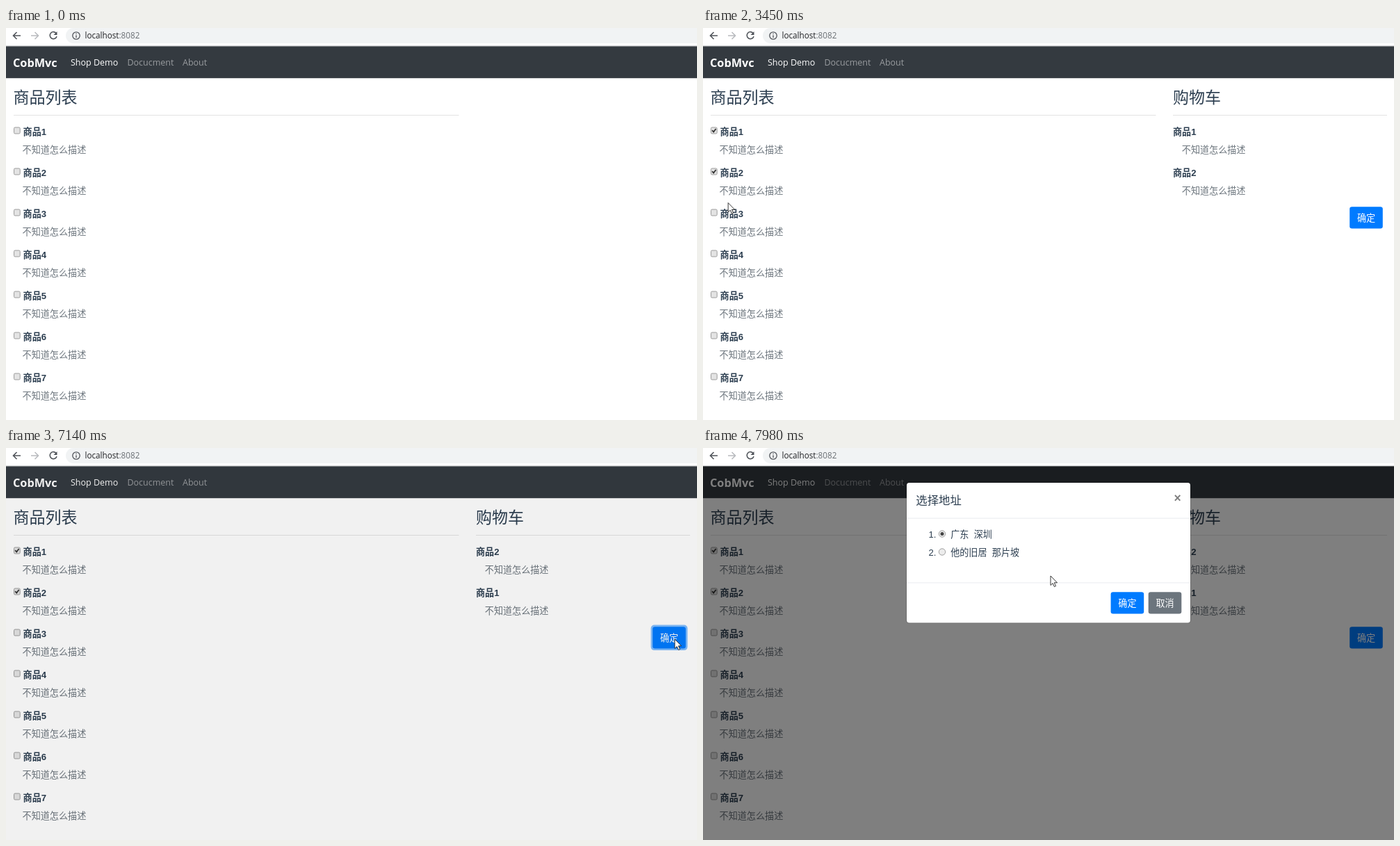
Animation of 994x564 px, one loop 8 s. Source, as an HTML page:

```html
<!DOCTYPE html>
<html lang="zh">
<head>
<meta charset="utf-8">
<title>Shop Demo</title>
<style>
html, body { margin: 0; width: 100%; height: 100%; overflow: hidden; background: #fff; }
svg { display: block; font: 13.1px "Liberation Sans", "Noto Sans CJK SC", "Noto Sans CJK", sans-serif; fill: #2c3e50; }
.ui { font-family: "Open Sans", "Noto Sans", sans-serif; }
.h { font-size: 23px; }
.b { font-weight: 700; }
.d { fill: #6c757d; }
</style>
</head>
<body>
<svg id="stage" width="994" height="564" viewBox="0 0 994 564">
  <g id="page"></g>
  <g id="live"></g>
  <g id="bar">
    <rect width="994" height="25" fill="#fff"/>
    <rect y="25" width="994" height="1.2" fill="#d5d6d8"/>
    <rect x="86" y="0" width="930" height="22" rx="11" fill="#f1f3f4"/>
    <g fill="none" stroke="#50545a" stroke-width="1.6">
      <path d="M21 11H11M15.5 6L10.5 11L15.5 16"/>
      <path d="M36 11H46M41.5 6L46.5 11L41.5 16" stroke="#b9bbbe"/>
      <path d="M72.3 7.7A5 5 0 1 0 73 12"/>
      <circle cx="101" cy="11" r="5.2" stroke-width="1.3"/>
      <path d="M101 10.3V14M101 7.8V9.1" stroke-width="1.3"/>
    </g>
    <path d="M73.5 5V10H68.5Z" fill="#50545a"/>
    <text class="ui" x="113.5" y="15" font-size="11.7" fill="#202124">localhost<tspan fill="#6b7075">:8082</tspan></text>
  </g>
  <g id="pointer"></g>
</svg>
<script>
const LOOP = 8000, ROW = 59;
const $ = id => document.getElementById(id);

const text = (x, y, s, cls = '', attrs = '') => `<text x="${x}" y="${y}" class="${cls}" ${attrs}>${s}</text>`;
const rect = (x, y, w, h, fill, attrs = '') => `<rect x="${x}" y="${y}" width="${w}" height="${h}" fill="${fill}" ${attrs}/>`;
const group = (s, opacity, attrs = '') => `<g opacity="${opacity}" ${attrs}>${s}</g>`;
const button = (x, y, s, fill) => rect(x, y, 47.6, 31.3, fill, 'rx="3.3"') + text(x + 23.8, y + 20.4, s, '', 'fill="#fff" text-anchor="middle"');
const product = (x, y, n) => text(x, y + 5.6, '商品' + n, 'b');
const detail = (x, y) => text(x, y + 31.7, '不知道怎么描述', 'd');

// Progress of a CSS cubic-bezier transition
function bezier(x1, y1, x2, y2) {
  const at = (a, b, s) => 3 * a * s * (1 - s) ** 2 + 3 * b * s * s * (1 - s) + s ** 3;
  return (t, start, dur) => {
    const x = (t - start) / dur;
    if (x <= 0) return 0;
    if (x >= 1) return 1;
    let lo = 0, hi = 1;
    for (let i = 0; i < 20; i++) {
      const mid = (lo + hi) / 2;
      if (at(x1, x2, mid) < x) lo = mid; else hi = mid;
    }
    return at(y1, y2, lo);
  };
}
const ease = bezier(.25, .1, .25, 1);
const easeOut = bezier(0, 0, .58, 1);
const linear = bezier(0, 0, 1, 1);

function checkbox(y, on) {
  return rect(11.5, y - 5, 8.7, 9, '#e3e3e3', 'rx="1.5" stroke="#9c9c9c"') +
    (on ? `<path d="M13.2 ${y - .8}l2 2.4l3.4 -4.6" fill="none" stroke="#333" stroke-width="1.8"/>` : '');
}

function drawPage() {
  let s = rect(0, 26.2, 994, 46, '#343a40') +
    text(10, 55.5, 'CobMvc', 'ui b', 'font-size="16.3" fill="#fff"') +
    text(92.9, 54, 'Shop Demo', 'ui', 'font-size="12.5" fill="#fff"') +
    text(174.4, 54, 'Docucment', 'ui', 'font-size="12.5" fill="#999c9f"') +
    text(254, 54, 'About', 'ui', 'font-size="12.5" fill="#999c9f"') +
    text(10.5, 107.7, '商品列表', 'h') + rect(11, 125, 640.5, 1, '#e3e3e3');
  for (let i = 0; i < 7; i++) {
    const y = 148 + i * ROW;
    s += product(24.6, y, i + 1) + detail(23.6, y);
  }
  return s;
}

// Pointer stops: time, x, y
const path = [
  [340, 776, 566], [1140, 43, 154], [1250, 43, 154], [1300, 41, 153], [1800, 41, 153],
  [2240, 41, 207], [3170, 41, 207], [3560, 35, 262], [4010, 38, 152], [5800, 38, 152],
  [6100, 895, 316], [6230, 895, 316], [6520, 967, 277], [6620, 967, 277], [6820, 962, 275],
  [7600, 962, 275], [7760, 804, 287], [7980, 500, 184]
];
function pointerAt(t) {
  const i = path.findIndex(p => p[0] > t);
  if (i < 0) return path[path.length - 1].slice(1);
  if (i === 0) return [776, 600];
  const [t0, x0, y0] = path[i - 1], [t1, x1, y1] = path[i];
  const u = (t - t0) / (t1 - t0), k = u * u * (3 - 2 * u);
  return [x0 + (x1 - x0) * k, y0 + (y1 - y0) * k];
}

const clicks = [[1460, 1540], [2380, 2540], [4090, 4200], [5180, 5250], [6980, 7060]];
const within = (t, a, b) => t >= a && t < b;

const arrow = '<path d="M0 0V13.5L3.1 10.6L5.4 15.6L7.5 14.6L5.3 9.8H9.5Z" fill="#fff" stroke="#222" stroke-width=".9"/>';
const hand = '<path d="M-1.5 10V1.2Q0 -1.2 1.5 1.2V6Q3.5 4.6 4.5 6.6Q6.5 5.4 7.4 7.4Q9.3 6.8 9.5 9V12.5L8 15.5V18H0V16L-4 10.8Q-4 8.6 -1.5 10ZM1.5 6V9M4.5 6.6V9.2M7.4 7.4V9.4" fill="#fff" stroke="#222" stroke-width=".9"/>';

function drawPointer(t, x, y) {
  const nearRow = Math.abs((y - 148 + ROW / 2 + ROW) % ROW - ROW / 2) < 10;
  const shape = x > 10 && x < 60 && y > 135 && nearRow ? hand : arrow;
  const glow = clicks.some(([a, b]) => within(t, a, b))
    ? `<circle cx="${x - .5}" cy="${y + 1}" r="10" fill="#f3ef3a" style="mix-blend-mode:multiply"/>` : '';
  return glow + `<g transform="translate(${x} ${y})">${shape}</g>`;
}

function drawCart(t) {
  const show = ease(t, 1540, 500);
  if (!show) return '';
  const left = 676 + 82 * (1 - show);
  let items;
  if (t < 2600) items = [[1, 1]];
  else if (t < 4770) items = [[1, 1 - ease(t, 4260, 500)], [2, ease(t, 2600, 500)]];
  else if (t < 5250) items = [[2, 1]];
  else items = [[2, 1], [1, ease(t, 5250, 500)]];
  const top = 139.2 + items.length * ROW;
  let s = text(left, 107.7, '购物车', 'h') + rect(left, 125, 984 - left, 1, '#e3e3e3');
  items.forEach(([n, alpha], i) => {
    const y = 148 + i * ROW;
    s += group(product(left, y, n) + detail(left + 12.8, y), alpha);
  });
  if (within(t, 7060, 7575)) s += rect(927.6, top - 2.6, 52.8, 36.5, '#80bdff', 'rx="5"');
  return group(s + button(930.2, top, '确定', '#007bff'), show);
}

function option(y, n, label, on) {
  return text(324.5, y + 4.8, n + '.') +
    `<circle cx="344" cy="${y - .5}" r="4.7" fill="#ececec" stroke="#a0a0a0"/>` +
    (on ? `<circle cx="344" cy="${y - .5}" r="2.5" fill="#444"/>` : '') +
    text(356.2, y + 5, label);
}
const gap = '\u00a0\u00a0';
const dialog = rect(292.2, 49.2, 409.6, 203, '#000', 'rx="4.5" opacity=".2"') +
  rect(293, 50, 408, 201.4, '#fff', 'rx="3.7"') +
  text(306.3, 81.3, '选择地址', '', 'font-size="16.4"') +
  text(682.5, 77.5, '×', 'b', 'font-size="17.5" fill="#7f7f7f" text-anchor="middle"') +
  rect(293, 100.6, 408, 1, '#e9ecef') + rect(293, 193.4, 408, 1, '#e9ecef') +
  option(124, 1, '广东' + gap + '深圳', true) + option(150, 2, '他的旧居' + gap + '那片坡', false) +
  button(586.6, 207.2, '确定', '#007bff') + button(640.7, 207.2, '取消', '#6c757d');

function drawModal(t) {
  const dim = linear(t, 7125, 150) / 2, p = easeOut(t, 7275, 300);
  return (dim ? rect(0, 26, 994, 538, '#000', `opacity="${dim}"`) : '') +
    (p ? group(dialog, p, `transform="translate(0 ${-41 * (1 - p)})"`) : '');
}

function frame() {
  const t = performance.now() % LOOP;
  const first = within(t, 1540, 4200) || t >= 5250;
  let s = '';
  for (let i = 0; i < 7; i++) s += checkbox(148 + i * ROW, i === 0 ? first : i === 1 && t >= 2560);
  $('live').innerHTML = s + drawCart(t) + drawModal(t);
  $('pointer').innerHTML = drawPointer(t, ...pointerAt(t));
  requestAnimationFrame(frame);
}

$('page').innerHTML = drawPage();
frame();
</script>
</body>
</html>
```
